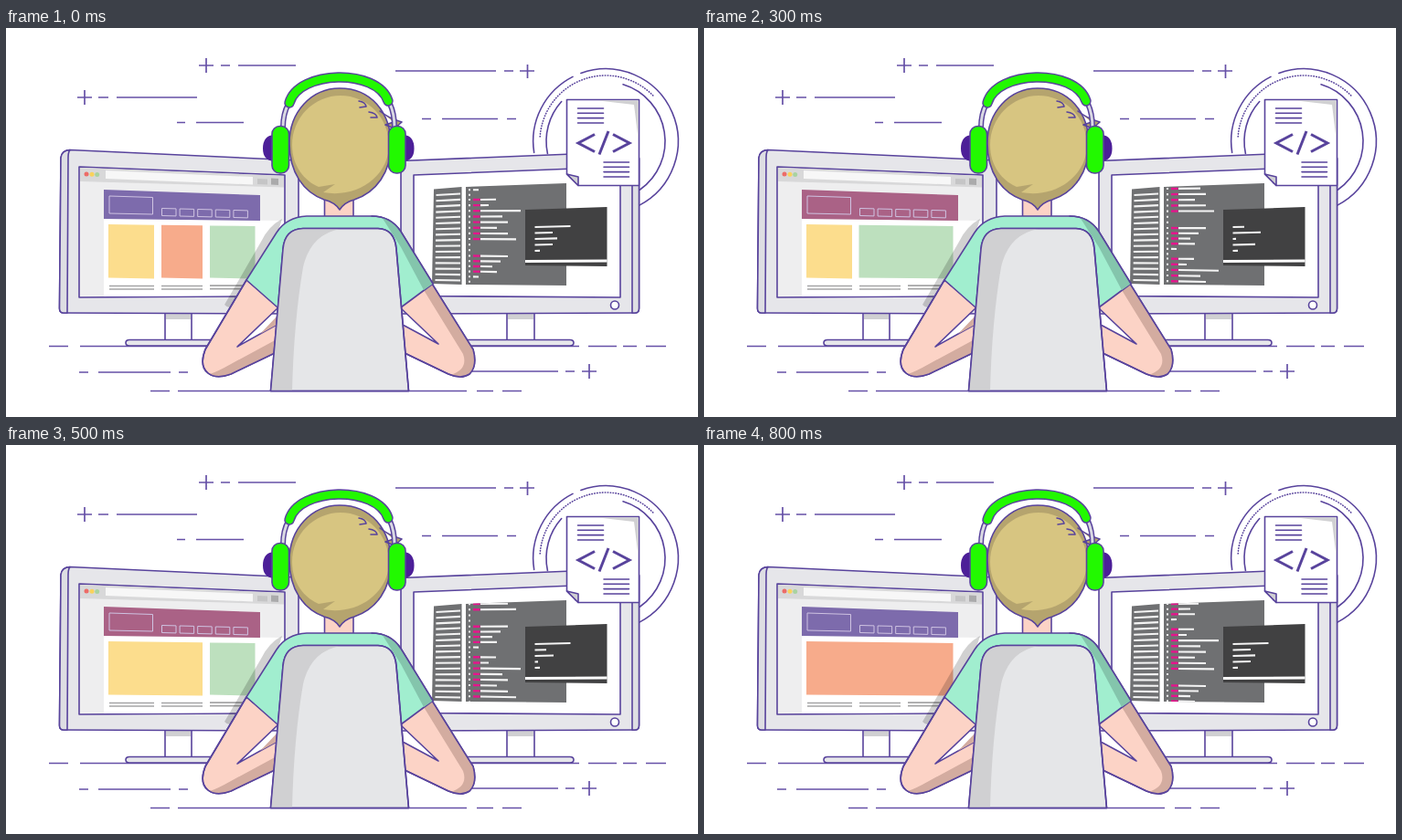
An HTML page for the animation above (900 ms loop, 757 by 426 pixels).

```html
<!DOCTYPE html>
<html lang="en">
<head>
<meta charset="utf-8">
<title>Developer at work</title>
<style>
html, body { margin: 0; width: 100%; height: 100%; overflow: hidden; background: #fff; }
svg { display: block; width: 100%; height: 100%; fill: none; }
.ink { stroke: #58439c; stroke-width: 1.6; stroke-linejoin: round; stroke-linecap: round; }
.back { stroke: #6650a7; stroke-width: 1.7; }
.body { fill: #e6e6ea; }
.side { fill: #dedee3; }
.shade { fill: #d0d0d2; }
.skin { fill: #fcd3c6; }
.skinShade { fill: #d3aca0; }
.mint { fill: #a1eecf; }
.green { fill: #22f900; }
.white { fill: #fff; }
.code { stroke: #f4f4f4; stroke-width: 2.1; }
.pink { stroke: #e5148c; stroke-width: 2.4; }
.flat { stroke: none; }
.bold { stroke-width: 3; stroke-linecap: butt; stroke-linejoin: miter; }
</style>
</head>
<body>
<svg viewBox="0 0 757 426">
  <defs>
    <clipPath id="editorClip"><path d="M503 174 613 170V282L503 281Z"/></clipPath>
    <clipPath id="headClip"><path id="headShape" d="M365 66C334 66 310 92 310 126C310 159 326 180 348 188Q360 191 365 199Q370 191 381 188C405 180 421 158 421 128C421 92 399 66 365 66Z"/></clipPath>
    <path id="arms" d="M309 83Q303 94 303 109M420 83Q425 94 425 109"/>
    <path id="band" d="M310 82C320 46 406 44 418 80"/>
  </defs>

  <path id="backLines" class="back"/>

  <!-- badge rings -->
  <g class="ink">
    <path id="rings"/>
    <path id="dottedRing" stroke-dasharray=".5 2.4"/>
  </g>

  <!-- left monitor -->
  <g class="ink">
    <path class="white" d="M174 311H203V342H174Z"/>
    <path class="shade flat" d="M175 313H202V319H175Z"/>
    <path class="body" d="M135 341.500H250V348H135Q131 348 131 344.800Q131 341.500 135 341.500Z"/>
    <path class="body" d="M60 142Q61 134 70 133.500L320 145V313L63 312Q58.500 312 58.500 307Z"/>
    <path class="side" d="M70 133.500Q61 134 60 142L58.500 307Q58.500 312 63 312H67L68 142Q68 136 70 133.500Z"/>
    <path d="M80 152 305 161V293.500L80 295Z" fill="#eeeeef"/>
  </g>
  <path class="white" d="M107 209 304 211V293L107 294Z"/>
  <path d="M81 153 304 162V174.500L81 168Z" fill="#d8d8d9"/>
  <path d="M109 156 270 163V171.500L109 165Z" fill="#f7f7f7"/>
  <path d="M275 165 286 165.400V171.400L275 171Z" fill="#c5c5c6"/>
  <path d="M290 164.500 298 165V172L290 171.600Z" fill="#aaaaab"/>
  <circle cx="88" cy="160" r="2.500" fill="#ed6c68"/>
  <circle cx="94" cy="160.300" r="2.500" fill="#f9d25c"/>
  <circle cx="99.700" cy="160.600" r="2.500" fill="#a9d3a1"/>
  <path id="banner" d="M107 177 278 183V211L107 209Z"/>
  <path id="menu" stroke="#cfc3e2" stroke-width="1"/>
  <g id="cards"></g>
  <path d="M113 282.500H162M113 286H162M170 282.500H215M170 286H215M223 282.200H272M223 285.600H272" stroke="#a5a5a6" stroke-width="1.700"/>

  <!-- right monitor -->
  <g class="ink">
    <path class="white" d="M548 311H578V342H548Z"/>
    <path class="shade flat" d="M549 313H577V319H549Z"/>
    <path class="body" d="M500 341.500H617Q621 341.500 621 344.800Q621 348 617 348H500Z"/>
    <path class="body" d="M432 145.500 682 135.500Q692 136 692.500 143V307Q692.500 312 688 312L432 313Z"/>
    <path class="side" d="M682 135.500Q692 136 692.500 143V307Q692.500 312 688 312H685V142Q685 137 682 135.500Z"/>
    <path class="white" d="M446 161 672 152V295L446 293.500Z"/>
    <circle class="white" cx="666" cy="303.500" r="4.500"/>
  </g>
  <path d="M468 176.500 498.500 174V281L466 280Z" fill="#6f7072"/>
  <path id="sideRows" class="code"/>
  <path d="M503 174 613 170V282L503 281Z" fill="#6f7072"/>
  <g clip-path="url(#editorClip)">
    <path id="codeRows" class="code"/>
    <path id="keywords" class="pink"/>
  </g>
  <path d="M568 199 657.500 196V261L568 260Z" fill="#414142"/>
  <path d="M568 255.500 657.500 255" stroke="#fff" stroke-width="3"/>
  <path id="terminalRows" class="code"/>

  <!-- code document -->
  <g class="ink">
    <path class="white" d="M613.500 78.500H692.500V172.500H626L613.500 160Z"/>
    <path class="shade flat" d="M646 79.300H691.700V122L687 84Z"/>
    <path class="shade" d="M613.500 160 626 163V172.500Z"/>
    <path d="M625.500 88H653.500M625.500 93.300H653.500M625.500 98.600H653.500M625.500 104H653.500M654 147H681.500M654 152.300H681.500M654 157.600H681.500M654 163H681.500"/>
    <path class="bold" d="M644 116.500 626 126 644 135.500M659 113 649 138.500M664 116.500 682 126 664 135.500"/>
  </g>

  <!-- person -->
  <path d="M302 209Q287 217 279 234L239 303Q244 309 252 303L297 225Z" fill="#000" opacity=".18"/>
  <g class="ink">
    <path class="skin" d="M263 276 218 352Q211 370 221 378Q230 385 246 379L296 355V325L253 349 299 305Z"/>
    <path class="skinShade flat" d="M223 379Q234 384 246 379L296 355V341L246 368Q232 376 223 379ZM296 325 278 335 296 316Z"/>
    <path class="skin" d="M466 280 511 352Q516 370 507 379Q498 385 484 379L434 355V325L473 346 431 306Z"/>
    <path class="skinShade flat" d="M466 280 511 352Q516 370 507 379Q498 385 486 380Q506 374 500 357L457 287Z"/>
    <path d="M263 276 218 352Q211 370 221 378Q230 385 246 379L296 355M466 280 511 352Q516 370 507 379Q498 385 484 379L434 355"/>
    <path class="skin" d="M348.500 185H380V208H348.500Z"/>
    <path class="mint" d="M263 276 296 224Q307 207 329 206H400Q421 206 432 223L467 280 432 306H297Z"/>
    <path class="flat" d="M411 207Q423 210 432 223L467 280 457 287 432 240Z" fill="#84c5ac"/>
    <path d="M400 206Q421 206 432 223L467 280"/>
    <path d="M289.500 397.500 303 242Q305 220 325 219.500H407Q425 220 427 242L440.500 397.500Z" fill="#e5e6e8"/>
    <path class="shade flat" d="M290 397 303 242Q305 220 325 220H366Q333 226 325 262Q315 320 313 397Z"/>
    <path d="M289.500 397.500 303 242Q305 220 325 219.500H407Q425 220 427 242L440.500 397.500Z"/>
  </g>

  <use href="#headShape" fill="#b5a46e"/>
  <path clip-path="url(#headClip)" d="M366 74C337 74 313 98 313 128C313 151 326 167 342 174L360 171 347 180C386 187 419 161 419 128C419 98 395 74 366 74Z" fill="#d7c581"/>
  <g class="ink">
    <path d="M409 91Q419 99 433 103L425 110 415 106 424 103" fill="#b5a46e"/>
    <use href="#headShape"/>
    <path d="M386 80Q393 81 394 86L387 87M397 92Q405 93 406 98L399 98"/>
  </g>

  <!-- headphones -->
  <g stroke-linecap="round">
    <use href="#arms" stroke="#58439c" stroke-width="6"/>
    <use href="#arms" stroke="#d9d8e2" stroke-width="3"/>
    <use href="#band" stroke="#58439c" stroke-width="11.500"/>
    <use href="#band" stroke="#22f900" stroke-width="8.500"/>
  </g>
  <path d="M293 117Q281 118 281 132Q281 145 293 146ZM435 117Q446.500 118 446.500 132Q446.500 145 435 146Z" fill="#4c1f98"/>
  <g class="ink green">
    <rect x="291" y="107.500" width="18.500" height="51.500" rx="8.500"/>
    <rect x="418.500" y="107.500" width="18.500" height="51.500" rx="8.500"/>
  </g>
</svg>

<script>
const byId = id => document.getElementById(id);
const setPath = (id, d) => byId(id).setAttribute("d", d);
const LOOP = 900, STEP = 100;

// Background dashes: y followed by pairs of x.
const dashes = [
  [41, 211, 227, 235, 245, 254, 317],
  [47, 426, 536, 545, 555, 562, 578],
  [76, 78, 94, 101, 112, 121, 209],
  [103.5, 187, 196, 208, 260],
  [99.5, 455, 465, 477, 538, 548, 558],
  [348.5, 47, 68, 81, 627, 637, 668, 675, 690, 700, 722],
  [377, 80, 90, 101, 180, 189, 199],
  [376, 510, 604, 612, 622, 630, 646],
  [397.5, 158, 179, 188, 504, 515, 533, 543, 564]
];
let lines = "M219 33V49M570.5 40V55M86 68V84M638 368V384";
for (const [y, ...xs] of dashes)
  for (let i = 0; i < xs.length; i += 2) lines += `M${xs[i]} ${y}H${xs[i + 1]}`;
setPath("backLines", lines);

// Arc around the badge centre, clockwise between two angles in degrees.
function arc(radius, from, to) {
  const point = angle => {
    const a = angle * Math.PI / 180;
    return `${656 + radius * Math.cos(a)} ${124 + radius * Math.sin(a)}`;
  };
  return `M${point(from)}A${radius} ${radius} 0 ${to - from > 180 ? 1 : 0} 1 ${point(to)}`;
}
setPath("rings", arc(79.3, 171, 243) + arc(79.3, 250, 423) + arc(65, 168, 222) + arc(65, 287, 415));
setPath("dottedRing", arc(72, 184, 316));

let menu = "M113 184 160.500 185.500V204L113 203Z";
for (let i = 0; i < 5; i++) {
  const x = 170.5 + i * 19.6, y = 197.5 + i * 0.5;
  menu += `M${x} ${y}l15.500 .4v8l-15.500 -.4Z`;
}
setPath("menu", menu);

let sideRows = "";
for (let i = 0; i < 16; i++) {
  const y = 183 + i * 6.2;
  sideRows += `M${470.5 - i * 0.07} ${y}L497 ${y - 1.5 + i * 0.13}`;
}
setPath("sideRows", sideRows);

// Page layouts: cards are [left, right, colour].
const yellow = "#fcdd8d", orange = "#f7ab8b", mint = "#bde0be";
const purple = "#7d6bac", plum = "#aa6286";
const pages = [
  { until: 300, banner: purple, cards: [[112, 162, yellow], [170, 215, orange], [223, 272.5, mint]] },
  { until: 500, banner: plum, cards: [[112, 162, yellow], [169.5, 272.5, mint]] },
  { until: 700, banner: plum, cards: [[112, 215, yellow], [223, 272.5, mint]] },
  { until: LOOP, banner: purple, cards: [[112, 272.5, orange]] }
];
const cardTop = x => 215 + (x - 112) * 0.013;

function drawPage(time) {
  const page = pages.find(p => time < p.until);
  byId("banner").setAttribute("fill", page.banner);
  byId("cards").innerHTML = page.cards.map(([a, b, fill]) =>
    `<path fill="${fill}" d="M${a} ${cardTop(a)}L${b} ${cardTop(b)}V274.500L${a} 273.500Z"/>`).join("");
}

// Repeating code listing: two blocks, a closing bracket and blank rows.
const PERIOD = 95, SPEED = 0.1015;
const rows = [
  ...[536, 528, 563, 543, 549, 537, 549, 558].map((end, i) => [i * 6.15, end]),
  [49.2], [55.3],
  ...[549, 541, 532, 537].map((end, i) => [61.5 + i * 5.7, end]),
  [84.3, 0], [89.8]
];

function drawCode(time) {
  const lean = y => ((y - 174) / 107 * 3.3 - 1.1) / 110;
  const dash = (a, b, y) => `M${a} ${y + (a - 507) * lean(y)}L${b} ${y + (b - 507) * lean(y)}`;
  let code = "", keywords = "";
  for (let start = 188 - PERIOD; start < 400; start += PERIOD)
    for (const [offset, end] of rows) {
      const y = start + offset - time * SPEED;
      if (y < 168 || y > 286) continue;
      code += dash(506, 508, y);
      if (end === 0) code += dash(511, 517, y);
      if (end) {
        code += dash(519, end, y);
        keywords += dash(511, 518.5, y);
      }
    }
  setPath("codeRows", code);
  setPath("keywords", keywords);
}

const outputs = {
  A: [617.5, 598, 603, 598, 584],
  B: [617.5, 591, 599, 582, 584],
  C: [591, 609, 582, 603, 584]
};

function drawTerminal(step) {
  const ends = outputs["ABBCABCCA"[step]];
  setPath("terminalRows", ends.map((end, i) => {
    const y = 218 + i * 6.5;
    return `M578.500 ${y}L${end} ${y - (end - 578.5) * 0.025}`;
  }).join(""));
}

function frame(now) {
  const step = Math.floor(now % LOOP / STEP), time = step * STEP;
  drawPage(time);
  drawCode(time);
  drawTerminal(step);
  requestAnimationFrame(frame);
}
frame(0);
</script>
</body>
</html>
```
